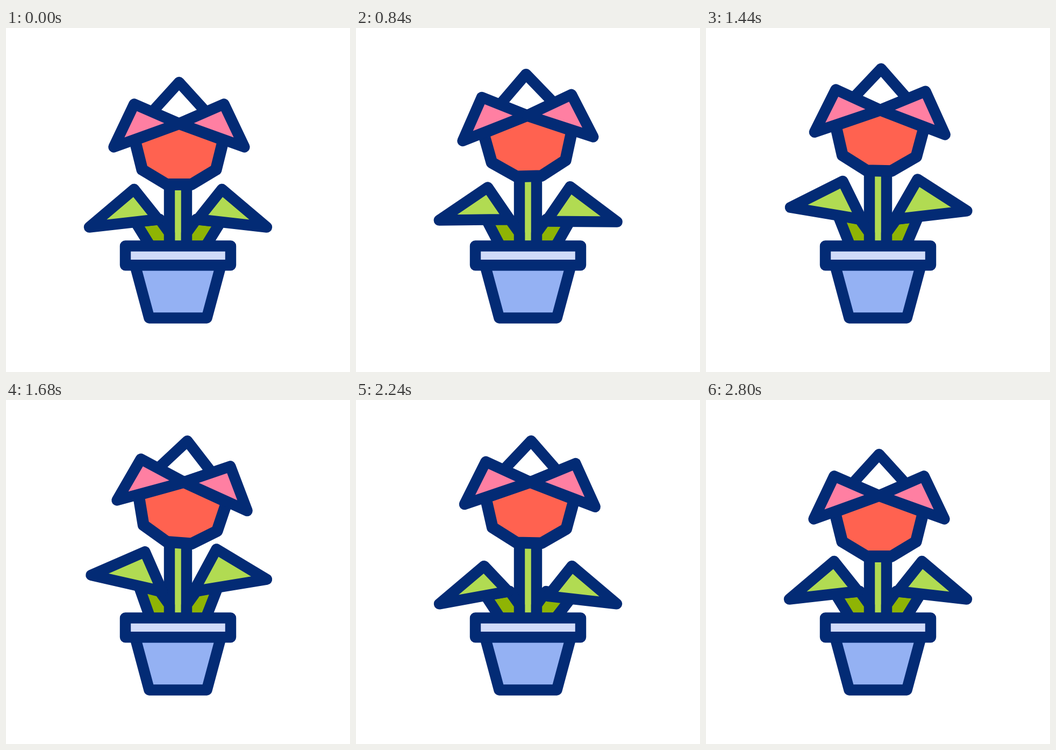
An HTML page with a canvas for the animation above (3 s loop, 640 px wide and 640 px high).

```html
<!DOCTYPE html>
<html lang="en">
<head>
<meta charset="utf-8">
<title>Dancing flower</title>
<style>
  html, body { margin: 0; width: 100%; height: 100%; overflow: hidden; background: #fff; }
  canvas { display: block; width: 100vmin; height: 100vmin; margin: 0 auto; }
</style>
</head>
<body>
<canvas id="stage" width="640" height="640"></canvas>
<script>
const ctx = document.getElementById('stage').getContext('2d');
const LOOP = 3000, STEP = 40, WEIGHT = 20.4;
const LINE = '#032b75', WHITE = '#ffffff', CORAL = '#ff6250', PINK = '#ff7fa2';
const LIME = '#b1db52', MOSS = '#8fb404', RIM = '#d0dbfa', POT = '#94b1f3';

const smooth = p => p * p * (3 - 2 * p);
const ramp = (t, from, to) => smooth(Math.min(1, Math.max(0, (t - from) / (to - from))));
const pulse = (t, from, peak, to) => ramp(t, from, peak) - ramp(t, peak, to);
const mix = (a, b, p) => a.map((v, i) => v + (b[i] - v) * p);
const radians = degrees => degrees * Math.PI / 180;
const mirror = (points, axis) => points.map(([x, y]) => [2 * axis - x, y]);
const symmetric = (half, axis) => [...half, ...mirror(half, axis).reverse()];

function rotate([x, y], [cx, cy], angle) {
  const c = Math.cos(angle), s = Math.sin(angle);
  return [cx + (x - cx) * c - (y - cy) * s, cy + (x - cx) * s + (y - cy) * c];
}

function shape(points, fill, weight = WEIGHT) {
  ctx.beginPath();
  points.forEach(([x, y]) => ctx.lineTo(x, y));
  ctx.closePath();
  ctx.fillStyle = fill;
  ctx.fill();
  ctx.lineWidth = weight;
  ctx.stroke();
}

// Drawn as a left leaf; the right one is its mirror image.
function leaf({ pivot, swing, sag, mirrored }, lift, droop) {
  const place = points => mirrored ? mirror(points, 320) : points;
  const raise = point => {
    const [x, y] = rotate(point, pivot, radians(swing * lift));
    return [x, y + droop];
  };
  const tip = raise([155, 370.5]), top = raise([238.3, 300]);
  const corner = [283 + 8 * lift, 356 + sag * droop];
  const joint = mix(tip, corner, 0.67);
  shape(place([joint, [286, 356], [304, 381], [304, 430], [268, 430], [268, 405]]), MOSS);
  shape(place([tip, top, corner]), LIME);
}

const leaves = [
  { pivot: [309, 360], swing: 17, sag: 0, mirrored: false },
  { pivot: [383, 352], swing: 9.4, sag: 1, mirrored: true }
];

function pot(drop) {
  shape(symmetric([[240, 441 + drop], [266.5, 539.5]], 320), POT);
  shape(symmetric([[222, 405.5 + drop], [222, 441.3 + drop]], 320), RIM);
}

function head(y, tilt) {
  const axis = 322, center = [axis, 177.8];
  const petal = [[200.5, 221.5], [238.5, 141.5], center];
  ctx.save();
  ctx.translate(axis, 291 + y);
  ctx.rotate(radians(tilt));
  ctx.translate(-axis, -291);
  shape([[axis, 101], [272, 156], center, [372, 156]], WHITE);
  shape([center, ...symmetric([[239.5, 208], [253.3, 263.5], [299, 291]], axis)], CORAL, 21.8);
  shape(petal, PINK);
  shape(mirror(petal, axis), PINK);
  ctx.restore();
}

function draw(t) {
  const drop = 12.6 * pulse(t, 200, 500, 800);
  const headY = drop - 25.4 * (ramp(t, 500, 1100) - ramp(t, 2200, 2800));
  const tilt = -2.9 * pulse(t, 500, 1100, 1780) + 5.1 * pulse(t, 1100, 1780, 2440);
  const lift = 0.6 * ramp(t, 500, 1100) + 0.4 * ramp(t, 1100, 1770) - ramp(t, 1770, 2195);
  const droop = 9 * (pulse(t, 200, 500, 1100) + pulse(t, 1770, 2195, 2800));

  ctx.fillStyle = WHITE;
  ctx.fillRect(0, 0, 640, 640);
  ctx.strokeStyle = LINE;
  ctx.lineJoin = 'round';
  shape(symmetric([[304, 291 + headY], [304, 430]], 320), LIME);
  leaves.forEach(side => leaf(side, lift, droop));
  pot(drop);
  head(headY, tilt);
}

const start = performance.now();
function tick() {
  const t = (performance.now() - start) % LOOP;
  draw(Math.floor(t / STEP) * STEP);
  requestAnimationFrame(tick);
}
tick();
</script>
</body>
</html>
```
